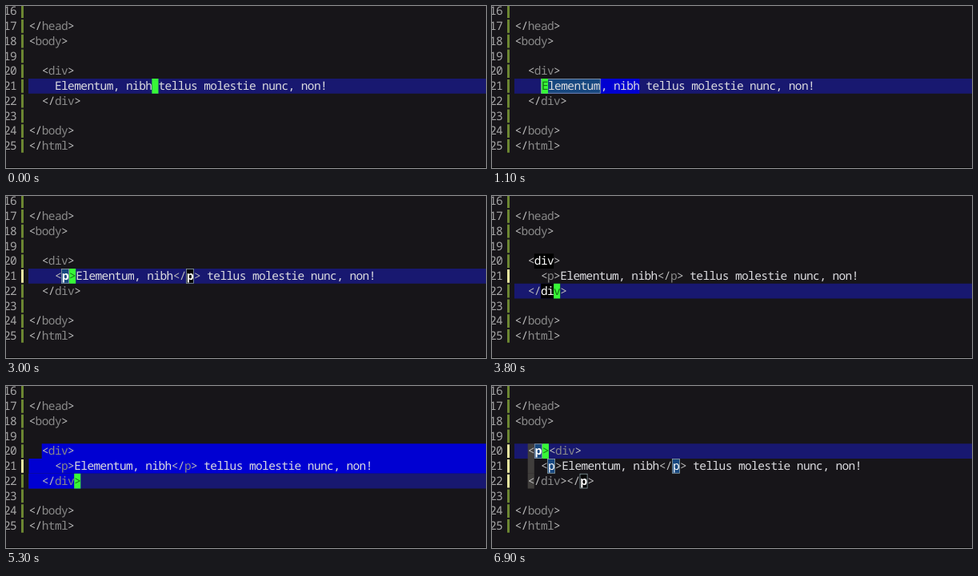
An HTML page that plays this animation: 600x203 px, repeating every 7000 ms.

```html
<!DOCTYPE html>
<html lang="en">
<head>
<meta charset="utf-8">
<title>Surround with tags</title>
<style>
  html, body { margin: 0; width: 100%; height: 100%; overflow: hidden; background: #171519; }
  svg { display: block; width: 100vw; height: 100vh; }
  text {
    font-family: "Noto Sans Mono", "DejaVu Sans Mono", monospace;
    font-size: 14.5px;
    text-rendering: geometricPrecision;
    white-space: pre;
  }
</style>
</head>
<body>
<svg id="stage" viewBox="0 0 600 203"></svg>
<script>
(() => {
  const LOOP = 7000;
  const LEFT = 28.5, CELL = 8.1, ROW = 18.75;
  const FIRST = 16, LAST = 25;
  const C = {
    bg: '#171519', line: '#181870', select: '#0000d2', cursor: '#38f838',
    text: '#dcdce0', bracket: '#bcbcbc', tag: '#898989', number: '#a8a8a8',
    saved: '#6c8632', changed: '#ece9a0', guide: '#403e3c',
    word: '#17477f', border: '#8ea3a8', black: '#000'
  };

  const plain = {
    17: '</head>', 18: '<body>', 20: '  <div>',
    21: '    Elementum, nibh tellus molestie nunc, non!',
    22: '  </div>', 24: '</body>', 25: '</html>'
  };
  const inner = { ...plain, 21: '    <p>Elementum, nibh</p> tellus molestie nunc, non!' };
  const outer = { ...inner, 20: '  <p><div>', 22: '  </div></p>' };

  // Marks are [row, column, length, fill, has border]; selections are [row, from, to].
  const mark = (row, col, fill, border = false, len = 1) => [row, col, len, fill, border];
  const first = { lines: plain, changed: [], marks: [], select: [] };
  const second = { ...first, lines: inner, changed: [21] };
  const third = { ...first, lines: outer, changed: [20, 21, 22], guide: true };
  const block = [[20, 2, 75], [21, 0, 75], [22, 0, 8]];
  const divs = [mark(20, 3, C.black, false, 3), mark(22, 4, C.black, false, 3)];

  const steps = [
    [0, { ...first, cursor: [21, 19] }],
    [400, { ...first, cursor: [21, 18] }],
    [700, { ...first, cursor: [21, 15], select: [[21, 15, 19]] }],
    [800, { ...first, cursor: [21, 13], select: [[21, 13, 19]] }],
    [900, { ...first, cursor: [21, 4], select: [[21, 4, 19]] }],
    [1100, { ...first, cursor: [21, 4], select: [[21, 4, 19]],
             marks: [mark(21, 4, C.word, true, 9)] }],
    [1500, { ...second, cursor: [21, 6],
             marks: [mark(21, 5, C.black), mark(21, 24, C.black)] }],
    [2000, { ...second, cursor: [21, 6],
             marks: [mark(21, 5, C.word, true), mark(21, 24, C.black, true)] }],
    [3800, { ...second, cursor: [22, 6], marks: divs }],
    [4200, { ...second, cursor: [21, 8] }],
    [4400, { ...second, cursor: [21, 8], select: [[21, 8, 75], [22, 0, 8]] }],
    [4500, { ...second, cursor: [22, 7], select: block }],
    [5700, { ...third, cursor: [20, 4],
             marks: [mark(20, 3, C.black), mark(22, 10, C.black)] }],
    [6200, { ...third, cursor: [20, 4],
             marks: [mark(20, 3, C.word, true), mark(21, 5, C.word, true),
                     mark(21, 24, C.word, true), mark(22, 10, C.black, true)] }]
  ];

  const rowTop = row => 91 + (row - 21) * ROW;
  const rect = (x, y, w, h, fill, extra = '') =>
    `<rect x="${x.toFixed(2)}" y="${y}" width="${w.toFixed(2)}" height="${h}" fill="${fill}" ${extra}/>`;
  const safe = s => s.replace(/&/g, '&amp;').replace(/</g, '&lt;');
  const glyphs = (s, xs, row, fill, bold) =>
    `<text x="${xs.map(x => x.toFixed(2)).join(' ')}" y="${rowTop(row) + 14}" fill="${fill}"` +
    `${bold ? ' font-weight="700"' : ''}>${safe(s)}</text>`;

  // A bordered mark takes one extra pixel on each side.
  function columnX(marks, col) {
    let x = LEFT + col * CELL;
    for (const [, from, len, , border] of marks) {
      if (border) x += col >= from + len ? 2 : col >= from ? 1 : 0;
    }
    return x;
  }

  function colours(line) {
    let inTag = false;
    return [...line].map(ch => {
      if (ch === '<') inTag = true;
      const fill = !inTag ? C.text : '</>'.includes(ch) ? C.bracket : C.tag;
      if (ch === '>') inTag = false;
      return fill;
    });
  }

  function drawRow(s, row) {
    const line = s.lines[row] || '';
    const marks = s.marks.filter(m => m[0] === row);
    const X = col => columnX(marks, col);
    const y = rowTop(row);
    const [curRow, curCol] = s.cursor;
    const fills = colours(line);
    const bold = new Set();
    let out = '';

    if (row === curRow) out += rect(28, y, 572, ROW, C.line);
    if (s.guide && row >= 20 && row <= 22) out += rect(X(2), y, CELL, ROW, C.guide);
    for (const [r, from, to] of s.select) {
      if (r === row) out += rect(X(from), y, X(to) - X(from), ROW, C.select);
    }
    for (const [, from, len, fill, border] of marks) {
      const x = X(from), w = len * CELL;
      out += border
        ? rect(x - .5, y + .5, w + 1, ROW - 1, fill, `stroke="${C.border}" stroke-width=".8"`)
        : rect(x, y, w, ROW, fill);
      for (let i = from; i < from + len; i++) {
        fills[i] = len > 3 ? C.text : '#fff';
        if (len === 1 && (fill === C.black || row === curRow)) bold.add(i);
      }
    }
    if (row === curRow) {
      out += rect(X(curCol), y, CELL, ROW, C.cursor);
      fills[curCol] = '#167016';
    }

    for (let i = 0; i < line.length;) {
      let end = i + 1;
      while (end < line.length && fills[end] === fills[i] && bold.has(end) === bold.has(i)) end++;
      // Leading spaces are dropped so that every x belongs to a drawn glyph.
      const part = line.slice(i, end), text = part.trimStart();
      const from = end - text.length;
      if (text) out += glyphs(text, [...text].map((_, k) => X(from + k)), row, fills[i], bold.has(i));
      i = end;
    }

    out += glyphs(String(row), [LEFT - 4 * CELL + .8, LEFT - 3 * CELL + .8], row, C.number);
    return out + rect(19, y + 1, 3, ROW - 2, s.changed.includes(row) ? C.changed : C.saved);
  }

  function draw(s) {
    let out = rect(0, 0, 600, 203, C.bg);
    for (let row = FIRST; row <= LAST; row++) out += drawRow(s, row);
    return out + rect(0, 202, 600, 1, '#050505');
  }

  const stage = document.getElementById('stage');
  const start = performance.now();
  let shown = null;

  function update() {
    const t = (performance.now() - start) % LOOP;
    const step = steps.filter(([at]) => at <= t).pop();
    if (step !== shown) {
      shown = step;
      stage.innerHTML = draw(step[1]);
    }
    requestAnimationFrame(update);
  }
  update();
})();
</script>
</body>
</html>
```
